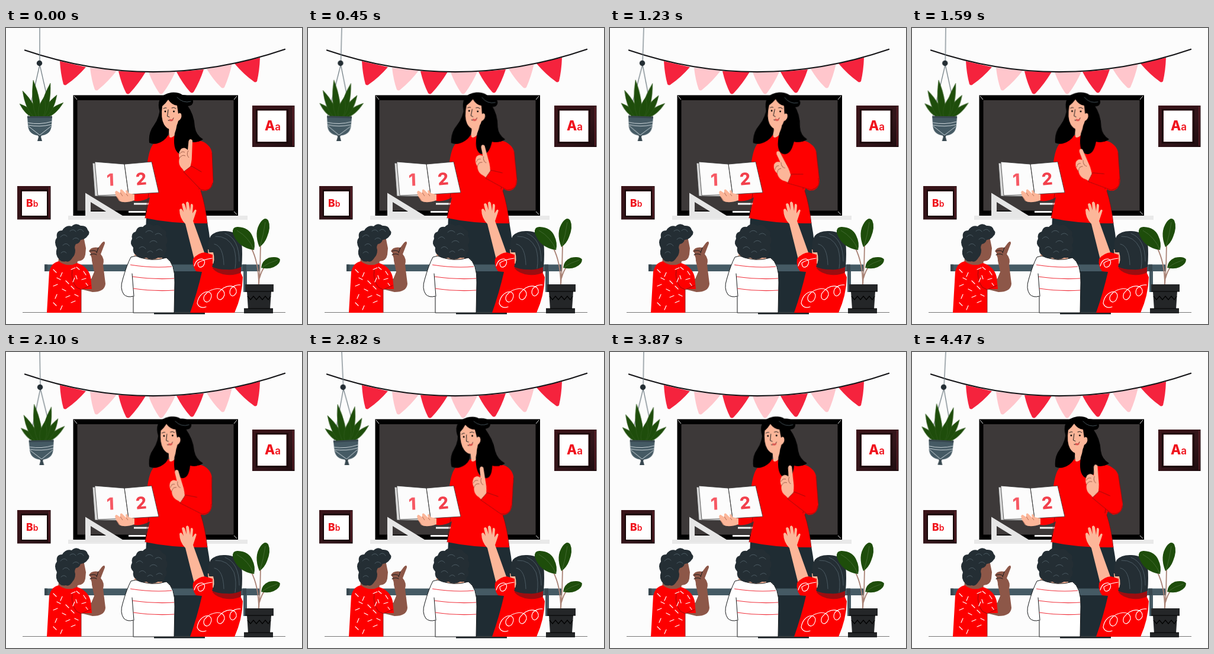
An HTML page that plays this animation: 500 px wide and 500 px high, repeating every 4.5 s.

```html
<!DOCTYPE html>
<html lang="en">
<head>
<meta charset="utf-8">
<title>Classroom</title>
<style>
  html, body { margin: 0; width: 100%; height: 100%; overflow: hidden; background: #fcfcfc; }
  svg { display: block; width: 100%; height: 100%; }
  text { font-family: Inter, "Open Sans", sans-serif; font-weight: 800; fill: #f0141e; }
  tspan { font-weight: 600; }
  .red { fill: #fe0000; }
  .skin { fill: #fcb699; }
  .brown { fill: #8d5748; }
  .dark { fill: #242e34; }
  .slate { fill: #455a64; }
  .green { fill: #1e4d0b; }
  .line { fill: none; stroke: #16191b; stroke-width: 1; stroke-linecap: round; stroke-linejoin: round; }
  .thin { fill: none; stroke: #7d1010; stroke-width: .8; stroke-linecap: round; }
  .curl { fill: none; stroke: #56666f; stroke-width: .8; stroke-linecap: round; }
  .white { fill: none; stroke: #fff; stroke-width: 1.2; stroke-linecap: round; }
  #hanging { transform-origin: 57px 0; }
  #hair { transform-origin: 286px 190px; }
  #head { transform-origin: 286px 190px; }
  #arm { transform-origin: 331px 203px; }
  #forearm { transform-origin: 334px 260px; }
</style>
</head>
<body>
<svg viewBox="0 0 500 500" xmlns="http://www.w3.org/2000/svg">
  <defs>
    <linearGradient id="wood" x2="1" y2="1">
      <stop offset="0" stop-color="#3b1318"/><stop offset=".6" stop-color="#32151a"/><stop offset="1" stop-color="#1d0b0e"/>
    </linearGradient>
  </defs>

  <!-- board -->
  <path d="M113.500 113.500H392V317H113.500Z"/>
  <path fill="#3d3939" d="M120.500 122H384.500V308.500H120.500Z"/>
  <path fill="none" stroke="#ddd" d="M115 115l5 6M390 115l-5 6M385 310l5 5"/>
  <path fill="#e9e9e9" d="M105 317H408V324H105Z"/>
  <path fill="none" stroke="#f4f4f4" stroke-width="3" d="M216 297H243M207 310.500H236"/>
  <path fill="#e6e6e6" fill-rule="evenodd" d="M134 278.500L197 317V321H134ZM143 294V310H169Z"/>

  <!-- bunting -->
  <g id="flags"></g>
  <path fill="none" stroke="#17171a" stroke-width="2.300" stroke-linecap="round" d="M32 37.500Q250 111.500 471 36"/>

  <!-- pictures -->
  <g>
    <path fill="url(#wood)" d="M416 131H487.500V201H416Z"/>
    <path fill="none" stroke="#190709" stroke-width="2" d="M423 138H476V194H423Z"/>
    <path fill="none" stroke="#65202a" stroke-width="1.500" d="M485 133V199"/>
    <path fill="#fff" d="M425 139.500H473.500V192H425Z"/>
    <text x="437" y="173" font-size="22.500">A<tspan font-size="17">a</tspan></text>
    <path fill="url(#wood)" d="M19 267H75.500V323.500H19Z"/>
    <path fill="none" stroke="#190709" stroke-width="2" d="M26 274H70V318H26Z"/>
    <path fill="none" stroke="#65202a" stroke-width="1.500" d="M73 269V321"/>
    <path fill="#fff" d="M27 276H69V317H27Z"/>
    <text x="34" y="301.500" font-size="17.500">B<tspan font-size="14">b</tspan></text>
  </g>

  <!-- hanging plant -->
  <g id="hanging">
    <path fill="none" stroke="#6d7a81" stroke-width="1.200" d="M57 -20V60M57 62L37 150M57 62L77 150"/>
    <circle class="dark" cx="56.500" cy="59.500" r="4.700"/>
    <g id="blades" class="green"></g>
    <path class="slate" d="M36 149H78L77 164Q76 181 57 182Q38 181 37 164Z"/>
    <path fill="#37474f" d="M36 149H78V152H36ZM54 181H60L59 184L61 191H53L55 184Z"/>
    <path fill="none" stroke="#cfd8dc" d="M36.500 160Q57 164 77.500 158M37 164Q57 168 77 163M38 166L57 181L76 166"/>
  </g>

  <!-- teacher -->
  <path fill="#1f2c33" d="M237 318L340 328Q347 365 347 400L325 482H284L276 405Q240 400 236 345Z"/>
  <path class="red" d="M275 181L253 192Q243 198 239 226L244 270L216 280L216 292Q230 294 243 286L235 321Q282 331 340 330Q337 300 329 275L347 220Q348 199 333 192L300 183Z"/>
  <path class="thin" d="M241 280L235 321M329 275Q337 300 340 330M325 244Q329 260 326 272"/>
  <path class="skin" d="M273 155L276 184Q280 188 290 176V150Z"/>
  <g id="hair">
    <path d="M260 132Q260 150 250 164Q240 177 242 194Q253 199 266 190Q277 182 275 170L268 150Z"/>
    <path d="M291 140Q290 165 285 178Q281 205 292 212Q307 218 311 192Q323 195 333 188Q321 181 319 167Q318 146 306 130Z"/>
  </g>
  <g id="head">
    <path d="M264 152Q254 132 260 120Q266 111 279 109Q291 108 298 113Q313 113 316 123Q317 131 307 132Q312 143 312 156L290 178L289 160Z"/>
    <path class="skin" d="M264 132Q261 152 267 163Q273 173 281 170Q289 167 291 157Q298 153 296 145Q293 142 291 145L289 131Q280 130 274 121Q270 127 264 132Z"/>
    <path class="line" d="M266 136q3-2 5-1M280 135q4-2 7 1M274 138L272.500 149L276 150.500M274 156Q281 158 283 152"/>
    <path fill="#d9544f" d="M276 153.500Q280 156 283 152.500Q283 159 276 157Z"/>
    <circle cx="269" cy="141" r="1.400"/><circle cx="283.500" cy="141" r="1.400"/>
    <path class="curl" stroke-width=".6" d="M289 117Q299 128 312 124"/>
  </g>

  <!-- book -->
  <path fill="#d9d9d9" stroke="#333" stroke-width=".8" d="M146 228L150 284L207 285L200 230Z"/>
  <path fill="#fcfcfc" stroke="#333" stroke-width=".8" stroke-linejoin="round" d="M150 226L200 230L207 281L155 283ZM200 230L246 226L258 278L207 281Z"/>
  <g font-size="28.500">
    <text x="170" y="266.500" style="fill:#f65964" transform="rotate(-2 178 256)">1</text>
    <text x="219" y="265" style="fill:#f2404c" transform="rotate(-5 228 254)">2</text>
  </g>
  <path class="skin" d="M217 281L207 279Q205 272 202 275L203 280L196 273Q192 271 193 279L187 275Q182 275 186 284L191 292Q200 297 217 291Z"/>
  <path fill="none" stroke="#a85f4a" stroke-width=".8" d="M193 278L197 284M203 280L206 284M187 285L192 292"/>

  <g id="arm">
    <path class="red" d="M323 192Q345 193 348 211L350 257Q349 275 333 275Q320 270 320 258Z"/>
    <path class="thin" d="M348 211L350 257"/>
    <g id="forearm">
      <path class="skin" d="M303 245L298 238Q290 231 293 220Q290 211 296 204Q302 200 307 206L308.500 191Q311 185 315 190L314 216Q314 227 310 238Z"/>
      <path fill="none" stroke="#8c4a38" stroke-width=".8" d="M293 213Q297 207 302 210M293 220Q297 213 303 216M308 207Q304 214 309 219"/>
      <path class="red" d="M300 243L313 233L341 245Q351 252 349 264Q344 277 331 275Z"/>
      <path class="thin" d="M330 243L313 233L300 243L329 273Q345 278 349 262"/>
    </g>
  </g>

  <!-- table -->
  <path class="slate" d="M65 399.500H428V411H65ZM401 411H407V446H401Z"/>
  <path fill="#37474f" d="M65 399.500H70V411H65ZM400 399.500H406V411H400Z"/>
  <path fill="none" stroke="#777" stroke-width="1" d="M28 480.500H472"/>
  <path fill="none" stroke="#182024" stroke-width="3" d="M250 482H336"/>

  <!-- first pupil -->
  <path class="brown" d="M90 370L88 402Q103 414 120 400L121 394Q132 394 134 383L135 372L131 352L110 350Z"/>
  <path class="brown" d="M126 441L146 446Q167 446 168 432L164 400Q167 390 160 382L167 364Q167 358 162 363L156 371Q144 369 140 377Q145 381 142 383Q145 386 145 393L149 412L144 424L132 410Z"/>
  <path class="line" stroke-width=".7" d="M142 377Q149 374 153 378M142 383Q148 380 153 383M156 371L153 380"/>
  <path class="dark" d="M90 391Q82 383 86 372Q80 361 86 354Q84 342 95 342Q101 332 111 335Q118 328 126 334Q136 333 138 341Q143 346 138 351Q134 357 126 358Q124 364 118 365Q115 369 117 375Q117 383 113 387Q107 397 101 394Q94 396 90 391Z"/>
  <path class="curl" d="M92 353q6-7 11-1M108 343q6-5 10 1M121 342q6-5 10 2M96 367q6-6 11 1M113 357q5-5 10 0M93 380q5-5 9 0"/>
  <path class="red" d="M89 394Q76 397 73 412L69 481H127V441L145 441L143 421Q139 403 120 397Q104 405 89 394Z"/>
  <path class="thin" d="M112 409Q109 425 119 438L127 442L143 435M127 442V480"/>
  <path class="white" id="dashes"/>

  <!-- second pupil -->
  <path class="skin" d="M217 370H264V396H217Z"/>
  <path fill="#fff" stroke="#16191b" stroke-width="1" d="M219 385L211 387Q204 400 197 425Q192 440 199 450Q205 456 215 453L215 481H284L285 430Q286 398 271 388Q246 396 219 385Z"/>
  <path class="line" d="M213 415L216 453"/>
  <path fill="none" stroke="#f0313c" stroke-width="1.200" d="M210 400Q248 406 280 403M214 420Q248 425 284 423M215 440Q248 445 284 443"/>
  <path class="dark" d="M221 385Q213 380 215 371Q208 364 213 356Q211 346 219 344Q222 334 231 336Q240 327 249 334Q259 330 264 339Q273 342 270 351Q276 360 270 366Q274 376 268 381Q268 390 257 388Q246 394 237 388Q228 391 221 385Z"/>
  <path class="curl" d="M220 356q6-7 11 0M236 345q6-6 12 0M252 349q6-5 11 1M225 372q6-6 11 1M243 362q6-6 12 0M254 376q6-5 10 0M239 379q5-5 9 0"/>

  <!-- third pupil -->
  <path class="skin" d="M318 391L303 331Q293 321 293 307Q296 302 300 311L297 298Q299 294 302 298L305 308L304 295Q307 291 309 296L311 309L312 298Q315 295 316 300L315 313L319 307Q323 306 321 311L316 326L336 382Z"/>
  <path class="skin" d="M341 374H360V402H343Z"/>
  <path class="red" d="M336 379Q324 380 316 390Q314 402 321 411L331 412Q323 447 311 481H386Q399 452 400 421L394 408L349 400L349 383Z"/>
  <path fill="#9c0d10" d="M349 398H397V413Q388 418 373 417Q356 415 349 406Z"/>
  <path class="dark" d="M343 379Q339 361 346 351Q354 342 371 343Q393 344 398 361Q400 382 398 403Q388 409 373 408Q356 408 348 403Q354 392 350 379Z"/>
  <path class="curl" d="M354 352Q375 351 385 372Q390 388 387 406M370 347Q394 356 394 394M352 365Q367 368 368 400"/>
  <path class="white" d="M318 402Q321 390 331 390Q339 393 333 402Q325 408 324 397Q332 391 348 389M323 465C326 444 347 440 347 453C344 469 330 463 335 452C347 437 370 436 369 451C364 465 353 458 358 448C369 432 391 432 389 447C383 459 374 449 380 440Q387 433 396 434M323 465Q327 475 338 471"/>

  <!-- potted plant -->
  <path fill="none" stroke="#a98275" stroke-width="1.800" d="M427 434Q430 400 430 365M427 434Q427 396 414 371M428 423Q432 408 439 401"/>
  <path class="green" d="M419 375Q391 371 383 346Q382 335 392 336Q410 337 416 351Q422 363 419 375ZM428 370Q418 345 430 328Q438 318 443 325Q448 336 441 353Q437 364 428 370ZM431 405Q432 393 444 388Q459 385 463 391Q463 399 452 404Q443 408 431 405Z"/>
  <path fill="none" stroke="#496f39" stroke-width=".8" d="M390 342Q410 353 419 375M438 328Q435 350 429 369M431 405Q444 396 458 392"/>
  <path fill="#242628" d="M404 433H452V445H404ZM407 445H448L446 475H409ZM402 474H451V482H402Z"/>
  <path fill="none" stroke="#000" stroke-width="1.200" d="M404 445H452M408 453l5 6 5-6 5 6 5-6 5 6 5-6 5 6 4-6M402 474H451"/>
</svg>
<script>
const $ = id => document.getElementById(id);

// left x, left y, right x, right y, tip x, tip y
const flags = [
  [91, 56, 135, 66, 100, 97], [142, 67, 187, 72, 153, 106], [190, 73, 236, 74, 206, 112],
  [241, 75, 286, 74, 262, 112], [288, 74, 334, 70, 314, 110], [339, 69, 382, 60, 366, 102],
  [386, 60, 429, 50, 421, 92]
];
$("flags").innerHTML = flags.map(([ax, ay, bx, by, tx, ty], i) => {
  const cx = (ax + bx + tx) / 3, cy = (ay + by + ty) / 3;
  // control point of a side, pushed out from the centre
  const side = (x, y) => {
    const mx = (x + tx) / 2, my = (y + ty) / 2;
    return `${mx + (mx - cx) * .25} ${my + (my - cy) * .25}`;
  };
  return `<path fill="${i % 2 ? "#ffc6cc" : "#f5233d"}" d="M${ax} ${ay}L${bx} ${by}
    Q${side(bx, by)} ${tx + 3} ${ty - 2}Q${tx} ${ty + 1} ${tx - 3} ${ty - 2}Q${side(ax, ay)} ${ax} ${ay}Z"/>`;
}).join("");

// each blade: tip and half width at the middle
const blades = [[23, 128, 5], [28, 106, 6], [97, 126, 5], [86, 113, 6], [46, 88, 6], [75, 93, 6], [64, 117, 6]];
$("blades").innerHTML = blades.map(([x, y, w]) => {
  const bx = 57 + (x - 57) * .22, by = 151;
  const dx = x - bx, dy = y - by, len = Math.hypot(dx, dy);
  const mx = bx + dx * .4, my = by + dy * .4, nx = -dy / len * w * 1.7, ny = dx / len * w * 1.7;
  return `<path stroke="#3a6328" stroke-width=".5" d="M${bx - 3} ${by}Q${mx - nx} ${my - ny} ${x} ${y}
    Q${mx + nx} ${my + ny} ${bx + 3} ${by}Z"/>`;
}).join("");

// short dashes scattered over the shirt
const slants = [[5, 5], [-3, 7], [7, -3], [6, 3]];
let dashes = "";
for (let row = 0; row < 5; row++)
  for (let col = 0; col < 3; col++) {
    const [dx, dy] = slants[(row * 3 + col) % 4];
    dashes += `M${80 + col * 15 + row % 2 * 6} ${408 + row * 14 + col % 2 * 5}l${dx} ${dy}`;
  }
$("dashes").setAttribute("d", dashes + "M119 404l5 4M131 411l4 6M118 418l2 6M128 425l7-2M135 431l3 4");

// angles at 0, 900, 2700 and 4500 ms
const offsets = [0, .2, .6, 1];
function swing(id, angles, turn = "rotate") {
  $(id).animate(
    angles.map((a, i) => ({ transform: `${turn}(${a}deg)`, offset: offsets[i] })),
    { duration: 4500, iterations: Infinity }
  );
}
swing("hanging", [0, 3, -3, 3]);
swing("head", [0, 7.5, -7.5, 0]);
swing("hair", [0, -7.5, 7.5, 0], "skewX");
swing("arm", [0, -6.5, 6.5, -6.5]);
swing("forearm", [0, -28, -18, 0]);
</script>
</body>
</html>
```
